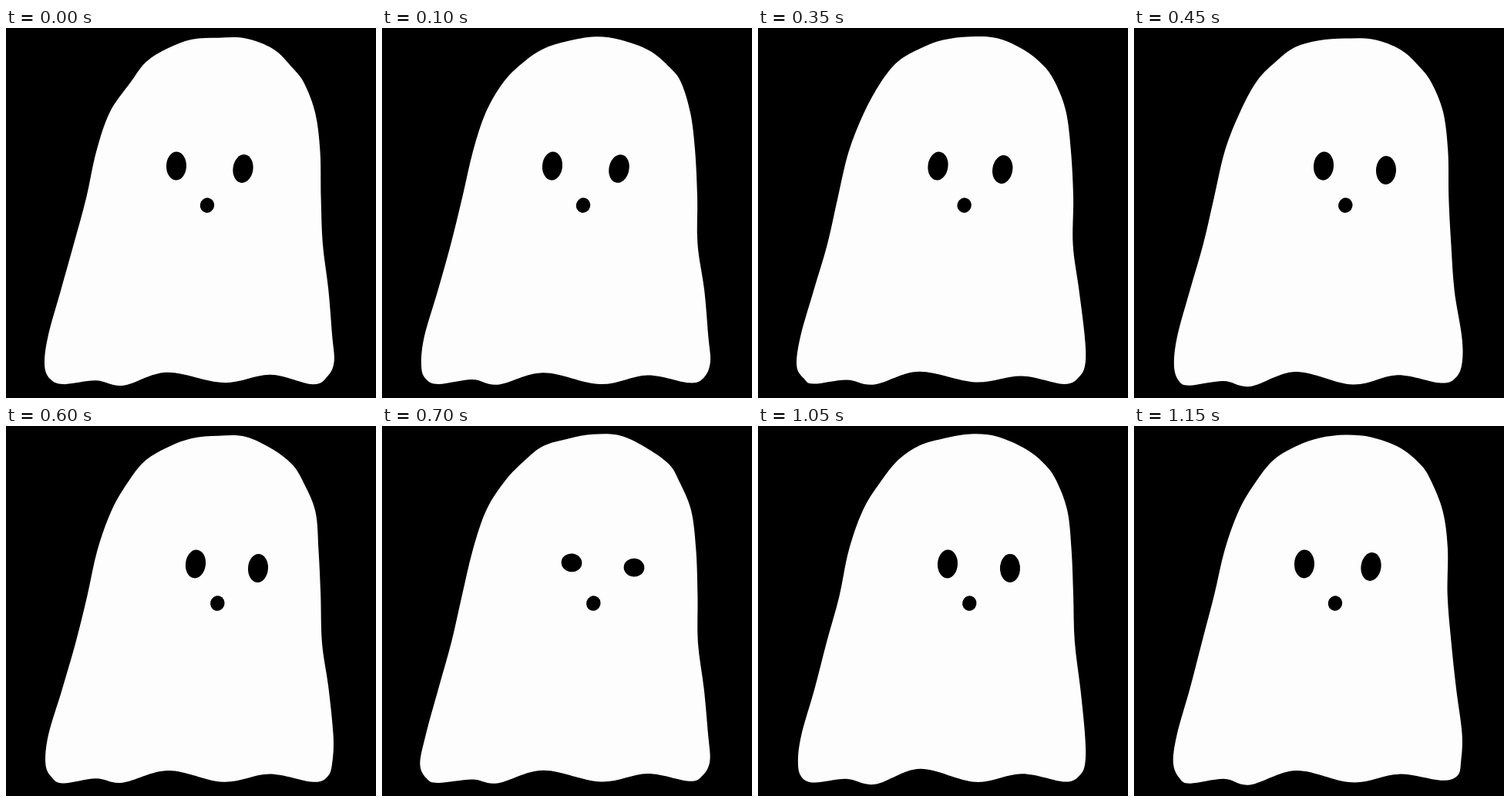
Animation of 480 by 480 pixels, one loop 1.2 s. Source, as an HTML page with a canvas:

```html
<!DOCTYPE html>
<html lang="en">
<head>
<meta charset="utf-8">
<title>Ghost</title>
<style>
  html, body { margin: 0; width: 100%; height: 100%; overflow: hidden; background: #000; }
  canvas { display: block; width: 100%; height: 100%; }
</style>
</head>
<body>
<canvas id="stage" width="480" height="480"></canvas>
<script>
const ctx = document.getElementById('stage').getContext('2d');
const LOOP = 1200, STEP = 50;

// The sheet at rest, clockwise from the lower left.
const sheet = [
  [56, 400], [72.5, 340], [89.5, 280], [105, 220], [118, 160], [136, 110],
  [160, 70], [183, 44], [210, 26], [240, 16], [275, 12], [310, 14],
  [347, 29], [372, 50], [387, 72], [401, 110], [406, 160], [408, 220],
  [410, 280], [417, 340], [424, 400], [425, 433], [418, 453], [398, 461],
  [343, 451], [283, 461], [209, 446], [151, 464], [116, 457.5], [73, 462.5],
  [58, 456], [50.5, 437]
];

// Repeatable noise from -1 to 1.
function noise(step, seed) {
  const s = Math.sin(step * 12.9898 + seed * 78.233) * 43758.5453;
  return (s - Math.floor(s)) * 2 - 1;
}

// 0 before step a, 1 after step b, linear between.
const ramp = (step, a, b) => Math.min(1, Math.max(0, (step - a) / (b - a)));

// Closed curve through all points.
function fillSmooth(p) {
  const at = i => p[(i + p.length) % p.length];
  ctx.beginPath();
  ctx.moveTo(...p[0]);
  p.forEach((b, i) => {
    const a = at(i - 1), c = at(i + 1), d = at(i + 2);
    ctx.bezierCurveTo(
      b[0] + (c[0] - a[0]) / 6, b[1] + (c[1] - a[1]) / 6,
      c[0] - (d[0] - b[0]) / 6, c[1] - (d[1] - b[1]) / 6,
      c[0], c[1]);
  });
  ctx.fill();
}

function oval(x, y, rx, ry, tilt) {
  ctx.beginPath();
  ctx.ellipse(x, y, rx, ry, tilt * Math.PI / 180, 0, Math.PI * 2);
  ctx.fill();
}

function dash(x, y, length, tilt) {
  ctx.save();
  ctx.translate(x, y);
  ctx.rotate(tilt * Math.PI / 180);
  ctx.beginPath();
  ctx.roundRect(-length / 2, -2, length, 4, 2);
  ctx.fill();
  ctx.restore();
}

function eye(x, y, open, tilt) {
  if (open > 0) oval(x, y, 14 - open, 2 + 16.5 * open, tilt);
  else dash(x, y, 26, 6);
}

function draw(step) {
  ctx.fillStyle = '#000';
  ctx.fillRect(0, 0, 480, 480);

  // Hand-drawn boil: every point strays a little on each step.
  ctx.fillStyle = '#fdfdfd';
  fillSmooth(sheet.map(([x, y], i) =>
    [x + 1.6 * noise(step, i), y + 1.6 * noise(step, i + 40)]));

  const gaze = ramp(step, 6, 8) - ramp(step, 21, 23);
  const open = 1 - ramp(step, 12, 17) + ramp(step, 18, 21);
  const lid = 1 - open;
  const sway = 4 * noise(step, 90);

  ctx.fillStyle = '#000';
  eye(221 + 25 * gaze, 179 - 4 * lid, open, 5 * open + sway);
  eye(307.5 + 19.5 * gaze, 182.5 + 2 * gaze - 2 * lid, open, 12 - 10 * gaze + sway);
  oval(261 + 13.3 * gaze, 230, 9.2, 9.8, 15 + sway);
}

function tick() {
  draw(Math.floor((performance.now() % LOOP) / STEP));
  requestAnimationFrame(tick);
}
tick();
</script>
</body>
</html>
```
